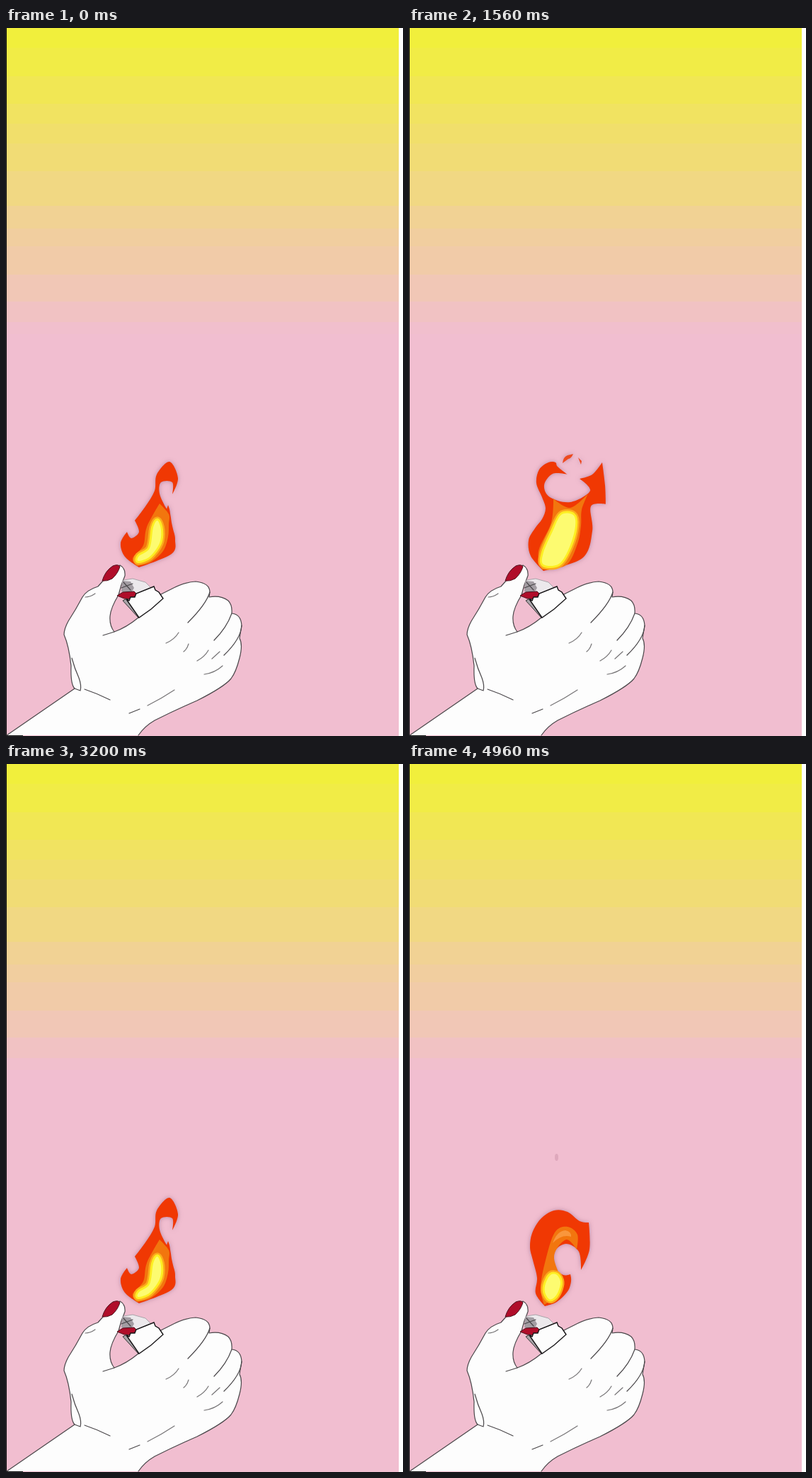
Animation of 561x999 px, one loop 5000 ms. Source, as an HTML page:

```html
<!DOCTYPE html>
<html lang="en">
<head>
<meta charset="utf-8">
<title>Lighter</title>
<style>
  html, body { margin: 0; width: 100%; height: 100%; overflow: hidden; background: #fff; }
  svg { display: block; width: 561px; height: 999px; }
  .ink { fill: none; stroke: #4a474a; stroke-width: 1.2; stroke-linecap: round; stroke-linejoin: round; }
  .skin { fill: #fdfdfd; }
  .nail { fill: #b00d2a; stroke: #4c1520; }
  #flame { filter: drop-shadow(0 0 3px rgba(125, 80, 115, .5)); }
  #flame path { stroke-linejoin: round; }
</style>
</head>
<body>
<svg viewBox="0 0 561 999">
  <g id="sky" shape-rendering="crispEdges"></g>
  <path d="M.5 0V999M0 998.5H24" stroke="#111" fill="none"/>

  <g id="hand">
    <path class="ink skin" d="M1 998L97 932Q91 926 92 900Q89 872 82 856Q82 848 88 837Q99 820 108 803Q114 793 130 788L138 779 161 758Q169 762 168 773Q162 786 159 800Q148 818 147 830Q146 843 153 852Q170 846 187 832L219 799 233 792Q251 782 268 781Q288 783 288 796L287 803Q303 800 314 808Q320 814 319 826Q332 827 333 843L330 861Q335 870 330 889Q325 909 318 918Q308 930 270 949Q238 963 210 977Q196 985 187 998"/>
    <g class="ink">
      <path d="M137 857L153 852M288 796Q283 813 257 839M319 826Q312 846 294 864M333 843Q332 862 308 885"/>
      <path d="M93 889Q97 904 103 917Q107 928 105 935L97 932M111 933Q129 939 147 948M174 967L189 961"/>
      <path stroke-opacity=".75" d="M200 956Q220 946 238 934M226 868Q238 863 244 853M251 880Q256 876 258 869M270 893Q281 887 286 878M280 912Q295 910 306 900M291 890L302 880M112 803Q119 803 126 798"/>
    </g>
    <path class="nail" d="M136 780Q140 766 151 759Q159 756 161 760Q158 770 150 777Q143 781 136 780Z"/>
    <path d="M166 779L179 777 197 782 205 790 184 799 164 795Z" fill="#ece9ec" stroke="#aaa4aa"/>
    <path d="M164 780L176 781 181 790 177 797 163 795Z" fill="#a39da3"/>
    <path class="ink" d="M166 782L176 793M163 790L179 784"/>
    <path class="nail" d="M157 801L165 796 181 795 185 799 177 806 167 805Z"/>
    <path d="M165 808L171 805 191 829 187 832Z" fill="#aaa5aa" stroke="#333"/>
    <path class="skin" d="M170 806L174 808 176 803 182 803 184 798 209 788 211 793 216 796 222 805 205 820 188 832Z" stroke="#161416" stroke-width="1.4"/>
  </g>

  <g id="flame">
    <path id="red" fill="#f03803"/>
    <path id="orange" fill="#f2760e"/>
    <path id="glint" d="M203 676Q209 659 221 658Q230 660 229 667Q216 663 203 676Z" fill="#f9963c"/>
    <path class="core" fill="#fbab1c" stroke="#fbab1c" stroke-width="11"/>
    <path class="core" fill="#fdee22" stroke="#fdee22" stroke-width="6"/>
    <path class="core" fill="#fdfb70"/>
    <path id="wisps" fill="#ee4a20" d="M217 614Q218 605 224 603L232 601Q229 608 225 608ZM239 606L244 611 243 616Z"/>
  </g>
  <ellipse id="smoke" cx="208.5" cy="555" rx="2.5" ry="5" fill="#d9a3b6"/>
</svg>
<script>
const $ = s => document.querySelector(s);
const set = (el, name, value) => el.setAttribute(name, value);
const mix = (a, b, t) => a + (b - a) * t;

// Sky: bands between these edges step from yellow to pink
const edges = [0, 28, 68, 107, 135, 163, 202, 251, 283, 308, 348, 386, 415, 432, 999];
edges.slice(0, -1).forEach((y, i) => {
  const t = Math.min(1, y / 432 + .02);
  const band = document.createElementNS("http://www.w3.org/2000/svg", "rect");
  const attrs = {
    x: 0, y, width: 555, height: edges[i + 1] - y,
    fill: `rgb(241 ${mix(240, 190, t)} ${mix(57, 208, t)})`
  };
  for (const k in attrs) set(band, k, attrs[k]);
  $("#sky").append(band);
});

// Three poses per shape; "!" marks a sharp point
const parse = pose => pose.split(" ").map(p => [...p.replace("!", "").split(",").map(Number), p.endsWith("!") ? 0 : 1]);
const shapes = [
  ["#red",
    "188,761! 168,746 162,727 171,711! 177,720 188,711 182,695! 197,675 210,653 213,630 231,612 243,635 235,658! 235,641 219,641 217,657 226,677 228,676 229,673! 231,679 232,685 233,691 234,698 236,707 239,722 234,742",
    "190,766! 172,745 169,723 178,706 188,693 193,678 188,662 180,642 184,623 197,613 207,613 210,619 224,630! 203,629 191,645 199,662 228,669 256,653 241,636! 259,630 273,613! 277,645 278,672! 257,675 259,710 245,748",
    "192,765! 179,747 181,725 175,700 171,682 174,662 186,642 205,630 224,632 241,645 254,647! 255,685 243,714! 240,688 222,677 206,688 207,711 218,721 228,720! 229,725 229,730 228,735 226,741 221,748 214,755 205,761"],
  ["#orange",
    "185,759! 179,748 194,730 199,704 217,671! 230,686 230,700 229,718 222,738 204,754",
    "188,764! 183,738 201,698 204,664! 228,677 253,657! 244,680 243,702 238,728 222,758",
    "191,763! 186,738 193,700 206,661 224,653 238,664 237,685! 222,671 205,695 216,738"],
  [".core",
    "187,752 188,745 203,734 208,705 214,695 219,708 217,727 203,746",
    "190,757 190,740 203,710 215,687 232,687 235,703 227,732 212,756",
    "198,755 192,745 193,733 200,721 209,721 214,731 211,744 205,753"]
].map(([sel, ...poses]) => ({ els: document.querySelectorAll(sel), poses: poses.map(parse) }));

// Closed smooth curve through [x, y, roundness] points
function curve(pts) {
  const n = pts.length;
  const handle = (i, dir) => {
    const [x, y, round] = pts[i], a = pts[(i + n - 1) % n], b = pts[(i + 1) % n];
    const s = dir * round / 6;
    return `${x + s * (b[0] - a[0])} ${y + s * (b[1] - a[1])}`;
  };
  return pts.reduce((d, _, i) => {
    const j = (i + 1) % n;
    return d + `C${handle(i, 1)} ${handle(j, -1)} ${pts[j][0]} ${pts[j][1]}`;
  }, `M${pts[0][0]} ${pts[0][1]}`) + "Z";
}

const STEP = 40, LOOP = 5000, CYCLE = 16;
const keys = [0, 7, 12, CYCLE];

function draw(step) {
  const k = keys.findLastIndex(v => v <= step);
  const t = (step - keys[k]) / (keys[k + 1] - keys[k]);
  for (const { els, poses } of shapes) {
    const to = poses[(k + 1) % poses.length];
    const d = curve(poses[k].map((p, i) => p.map((v, c) => mix(v, to[i][c], t))));
    els.forEach(el => set(el, "d", d));
  }
  const rise = step - 7;
  const size = Math.max(0, 1 - Math.abs(rise) / 5);
  set($("#wisps"), "transform", `translate(${228 - 3 * rise} ${607 - 9 * rise}) scale(${size}) translate(-228 -607)`);
  set($("#glint"), "opacity", Math.max(0, 1 - Math.abs(step - 12) / 2));
  set($("#smoke"), "opacity", step === 12 ? .8 : 0);
}

const start = performance.now();
let last = -1;
function tick() {
  const step = Math.floor((performance.now() - start) % LOOP / STEP) % CYCLE;
  if (step !== last) draw(last = step);
  requestAnimationFrame(tick);
}
tick();
</script>
</body>
</html>
```
